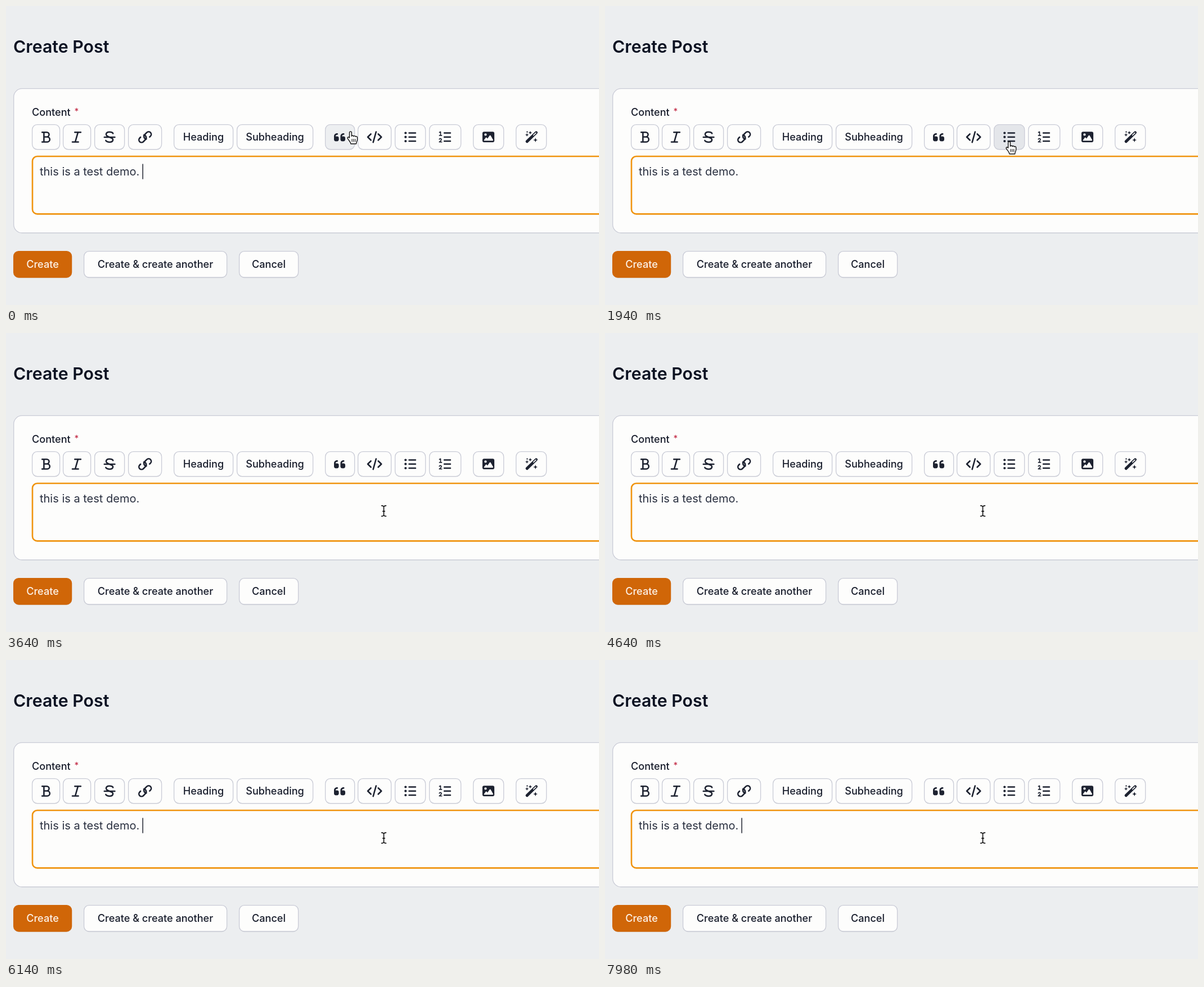
Recreate the animation shown at these times as an HTML page. Size 1054 by 531 pixels, loop 8 s.

```html
<!DOCTYPE html>
<html lang="en">
<head>
<meta charset="utf-8">
<title>Create Post</title>
<style>
html, body { margin: 0; width: 100%; height: 100%; overflow: hidden; background: #eceef0; }
svg { display: block; width: 1054px; height: 531px; font-family: Inter, "Open Sans", sans-serif; }
text { fill: #171c2b; }
.label { font-size: 18.1px; font-weight: 500; }
.box { fill: #fdfdfc; stroke: #c9cbd6; stroke-width: 1.3; }
.icon { fill: none; stroke: #1d2230; stroke-width: 2.6; stroke-linecap: round; stroke-linejoin: round; }
.solid { fill: #1d2230; stroke: none; }
.paper { fill: #fdfdfc; stroke: none; }
</style>
</head>
<body>
<svg viewBox="0 0 1054 531">
  <rect width="1054" height="531" fill="#eceef0"/>
  <text x="13" y="83" font-size="30.3" font-weight="600" style="fill:#0c1222">Create Post</text>
  <rect class="box" x="13.7" y="146.7" width="1080" height="256.3" rx="15"/>
  <text class="label" x="46" y="195">Content</text>
  <text x="121.5" y="192" font-size="15" font-weight="500" style="fill:#c4304a">*</text>
  <g id="buttons"></g>

  <g class="icon">
    <path d="M64.2 224.2H72.4a4.1 4.1 0 0 1 0 8.3H67.5M72.4 232.5h.9a4.5 4.5 0 0 1 0 9H64.2M67.4 224.2V241.5"/>
    <path d="M122.3 224.2h10.6M118 241.5h10.6M128 224.2L123 241.5"/>
    <path d="M174.8 233h18.6M190.2 226.3C188.8 223.5 178.8 222 178 227.4c-.3 2.6 2.2 4.3 6 5.6c4.6 1.4 6.6 3 6 5.4c-1.2 4.8-10.6 3.8-12.6.4"/>
    <g id="link" transform="translate(247.2 232.8)"></g>
    <path d="M648.6 227.3L643 232.8l5.6 5.5M661.6 227.3l5.6 5.5l-5.6 5.5M657.8 223.5l-5.2 18.6"/>
    <path d="M716.5 225.5h11.3M716.5 232.7h11.3M716.5 240h11.3M779 225.5h10.8M779 232.7h10.8M779 240h10.8"/>
    <path stroke-width="1.7" d="M770.4 224.4l2-.9v6.2M770.4 229.9h4M770.2 236.6q1.6-1.9 3.4-.6q1.6 1.6-3.4 5.5h4.3"/>
  </g>
  <g class="solid">
    <circle cx="710.2" cy="225.5" r="2.1"/><circle cx="710.2" cy="232.7" r="2.1"/><circle cx="710.2" cy="240" r="2.1"/>
    <g id="quotes" transform="translate(583 221.6) scale(.0446)"></g>
    <rect x="846.8" y="223.2" width="21.2" height="18.8" rx="3"/>
    <path id="stars"/>
  </g>
  <circle class="paper" cx="852.3" cy="228.4" r="2.1"/>
  <path class="paper" d="M850 239.3q-1-.3-.4-1.3l3.2-4.2q.8-.8 1.6 0l1.4 1.7l3.8-5.6q.9-1 1.8 0l4.4 7.9q.4 1.2-.8 1.5z"/>
  <path d="M926 240.6L942.4 224.8" fill="none" stroke="#1d2230" stroke-width="5" stroke-linecap="round"/>
  <path d="M937.6 229.4L941.8 225.4" fill="none" stroke="#fdfdfc" stroke-width="1.5" stroke-linecap="round"/>

  <rect x="47" y="267" width="1060" height="102.4" rx="8.5" fill="#fdfdfc" stroke="#f0940f" stroke-width="2.6"/>
  <text x="60" y="301" font-size="20" style="fill:#2a3040">this is a test demo.</text>
  <rect id="caret" x="242.4" y="280.5" width="1.5" height="27" fill="#20242f"/>

  <g id="hand" fill="#fff" stroke="#111" stroke-width="1.4" stroke-linejoin="round" stroke-linecap="round">
    <path d="M-1.9 1.7a1.9 1.9 0 0 1 3.8 0V8.2c.3-1.8 3.3-1.6 3.5.3c.5-1.5 3.1-1.2 3.4.6c.8-1.3 3.3-.7 3.3 1.4V14c0 2.6-1.9 3.7-2 7.7H.4C.2 18.4-2.6 16.4-5.1 12.4C-6.3 10.2-4 8.6-1.9 11z"/>
    <path d="M2.6 13.2v4.6M5.4 13.2v4.6M8.2 13.2v4.6" stroke-width="1.1"/>
  </g>
  <g id="beam" fill="none" stroke-linecap="round">
    <path id="halo" stroke="#fff" stroke-width="3.4"/>
    <path id="stem" stroke="#111" stroke-width="1.6"/>
  </g>
</svg>
<script>
const LOOP = 8000;
const $ = id => document.getElementById(id);
const add = (parent, tag, attrs, text) => {
  const el = document.createElementNS("http://www.w3.org/2000/svg", tag);
  for (const k in attrs) el.setAttribute(k, attrs[k]);
  if (text) el.textContent = text;
  return parent.appendChild(el);
};

// Buttons: left, right, optional label
const TOP = 210.6, BOTTOM = 254.6;
const tools = [
  [46, 96], [101, 151], [157, 211], [217, 277],
  [298, 404, "Heading"], [410, 546, "Subheading"],
  [567, 620], [625, 685], [691, 746], [752, 809], [830, 885], [906, 961]
];
const actions = [[13, 117, "Create"], [138, 393, "Create & create another"], [414, 520, "Cancel"]];

function button([left, right, label], top, bottom, primary) {
  const box = { x: left + .6, y: top, width: right - left - 1, height: bottom - top, rx: 9 };
  add($("buttons"), "rect", { ...box, y: top + 1.2, fill: "#000", opacity: .07 });
  const rect = add($("buttons"), "rect", { ...box, class: "box" });
  if (primary) rect.style.cssText = "fill:#d06608;stroke:#d06608";
  const over = add($("buttons"), "rect", { ...box, fill: "#e4e6ea", stroke: "#c9cbd6", opacity: 0 });
  if (label) {
    const text = add($("buttons"), "text", {
      x: (left + right) / 2, y: (top + bottom) / 2 + 6.5, class: "label", "text-anchor": "middle"
    }, label);
    if (primary) text.style.fill = "#fdf3e8";
  }
  return over;
}
const overlays = tools.map(b => button(b, TOP, BOTTOM));
actions.forEach((b, i) => button(b, 435.6, 482, i === 0));

// Icons built from repeated parts
for (const turn of [0, 180])
  add($("link"), "path", {
    transform: `rotate(${turn}) translate(4.4 -3) rotate(-45)`,
    d: "M.6 4.6H2.7a4.6 4.6 0 0 0 0-9.2H-2.7a4.6 4.6 0 0 0-3.4 7.6"
  });
for (const x of [0, 256])
  add($("quotes"), "path", {
    transform: `translate(${x})`,
    d: "M0 216C0 150 54 96 120 96h8c18 0 32 14 32 32s-14 32-32 32h-8c-31 0-56 25-56 56v8h64c35 0 64 29 64 64v64c0 35-29 64-64 64H64c-35 0-64-29-64-64z"
  });
const star = (x, y, r) => {
  const q = r * .28;
  return `M${x} ${y - r}l${q} ${r - q}l${r - q} ${q}l${q - r} ${q}l${-q} ${r - q}l${-q} ${q - r}l${q - r} ${-q}l${r - q} ${-q}z`;
};
$("stars").setAttribute("d", star(931.8, 225, 3.2) + star(926, 228.8, 3.2) + star(926.3, 223.6, 1.9) + star(941, 238, 4));
for (const id of ["halo", "stem"])
  $(id).setAttribute("d", "M-4-9.4Q0-9.4 0-6.6Q0-9.4 4-9.4M0-6.6V6.6M-4 9.4Q0 9.4 0 6.6Q0 9.4 4 9.4M-1.8.6H1.8");

// Pointer path: start, end, target x, target y, easing
const easeOut = u => 1 - (1 - u) ** 3;
const easeBoth = u => u * u * (3 - 2 * u);
const moves = [
  [0, 800, 718.5, 241, easeOut],
  [1960, 2740, 668, 317, easeBoth],
  [2840, 3200, 671.5, 316, easeBoth]
];
function pointer(t) {
  let x = 612, y = 223;
  for (const [from, to, tx, ty, ease] of moves) {
    const k = ease(Math.min(1, Math.max(0, (t - from) / (to - from))));
    x += (tx - x) * k;
    y += (ty - y) * k;
  }
  return [x, y];
}

function hits(t, [left, right]) {
  if (t < -100) return false;
  const [x, y] = pointer(t);
  return x >= left && x <= right && y >= TOP && y <= BOTTOM;
}
const FADE = [0, 50, 100, 150, 200];

const BLINK = 1400, FIRST_OFF = 760;
const caretOn = t => Math.floor((t - FIRST_OFF) / BLINK) % 2 !== 0;

function draw(t) {
  const [x, y] = pointer(t), typing = y > 266;
  $("hand").setAttribute("visibility", typing ? "hidden" : "visible");
  $("beam").setAttribute("visibility", typing ? "visible" : "hidden");
  $(typing ? "beam" : "hand").setAttribute("transform", `translate(${x} ${y})`);
  $("caret").setAttribute("visibility", caretOn(t) ? "visible" : "hidden");
  overlays.forEach((el, i) =>
    el.setAttribute("opacity", FADE.filter(d => hits(t - d, tools[i])).length / FADE.length));
}

const start = performance.now();
function tick() {
  draw((performance.now() - start) % LOOP);
  requestAnimationFrame(tick);
}
tick();
</script>
</body>
</html>
```
